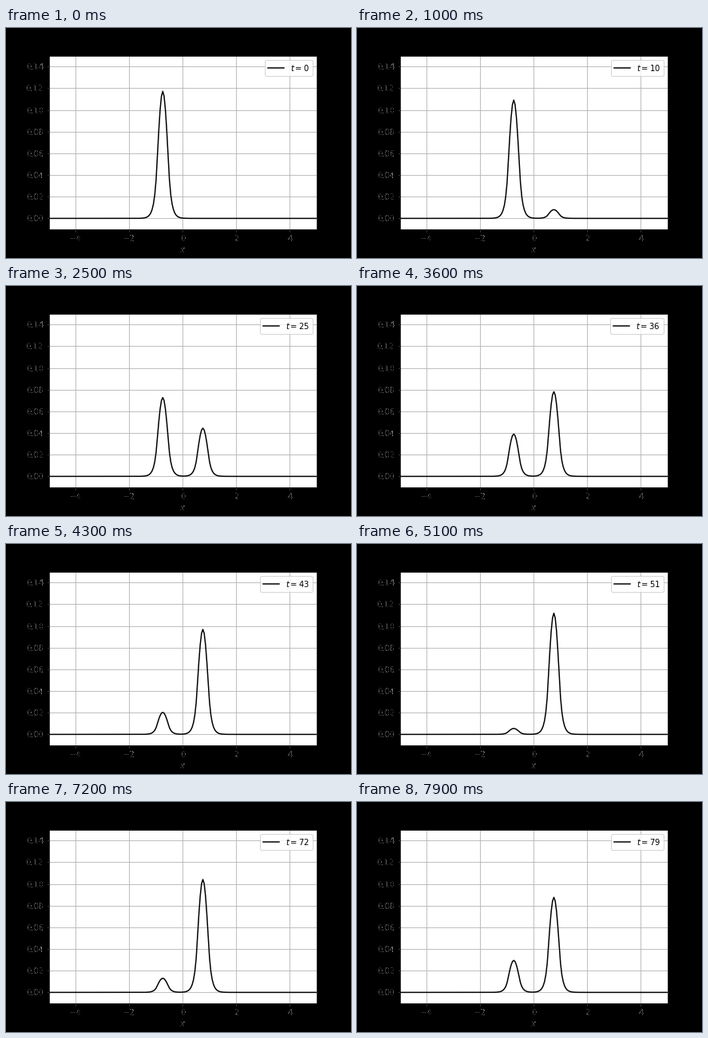
A matplotlib script for the animation above (8000 ms loop, 432 by 288 pixels).

```python
import numpy as np
import matplotlib.pyplot as plt
from matplotlib.animation import FuncAnimation

FRAMES = 80
OMEGA = 0.02654   # half the splitting of the two lowest levels
V0 = 20.0


def localized_states(n=201):
    """Left and right combinations of the lowest pair in a double square well."""
    x = np.linspace(-5, 5, n)
    dx = x[1] - x[0]
    wells = np.abs(np.abs(x) - 0.75) < 0.24
    potential = np.where(wells, 0.0, V0)
    hop = np.full(n - 1, -0.5 / dx**2)
    h = np.diag(potential + 1 / dx**2) + np.diag(hop, 1) + np.diag(hop, -1)
    even, odd = np.linalg.eigh(h)[1][:, :2].T
    a, b = (even + odd) / np.sqrt(2), (even - odd) / np.sqrt(2)
    if np.sum(x * a**2) > 0:
        a, b = b, a
    return x, a, b


def flatten(img, dpi):
    """Blend onto white and keep only pixels that are at least half opaque."""
    alpha = img[..., 3:]
    out = np.ones_like(img)
    out[..., :3] = img[..., :3] * alpha + 1 - alpha
    out[..., 3:] = alpha >= 0.5
    return out, 0, 0


x, left, right = localized_states()

fig = plt.figure(figsize=(6, 4), dpi=72, facecolor="black")
ax = fig.add_axes([0.125, 0.125, 0.775, 0.755], facecolor="white")
ax.set_agg_filter(flatten)
ax.set_xlim(-5, 5)
ax.set_ylim(-0.01, 0.15)
ax.set_xticks(range(-4, 5, 2))
ax.set_yticks(np.arange(8) * 0.02)
ax.set_xlabel("$x$")
ax.grid(True)

line, = ax.plot(x, left**2, color="black", lw=1.5, label="$t=0$")
label = ax.legend(loc="upper right").get_texts()[0]


def update(t):
    phase = OMEGA * t
    line.set_ydata((np.cos(phase) * left)**2 + (np.sin(phase) * right)**2)
    label.set_text(f"$t={t}$")
    return line, label


anim = FuncAnimation(fig, update, frames=FRAMES, interval=100,
                     repeat=True, repeat_delay=0, blit=False)
plt.show()
```
